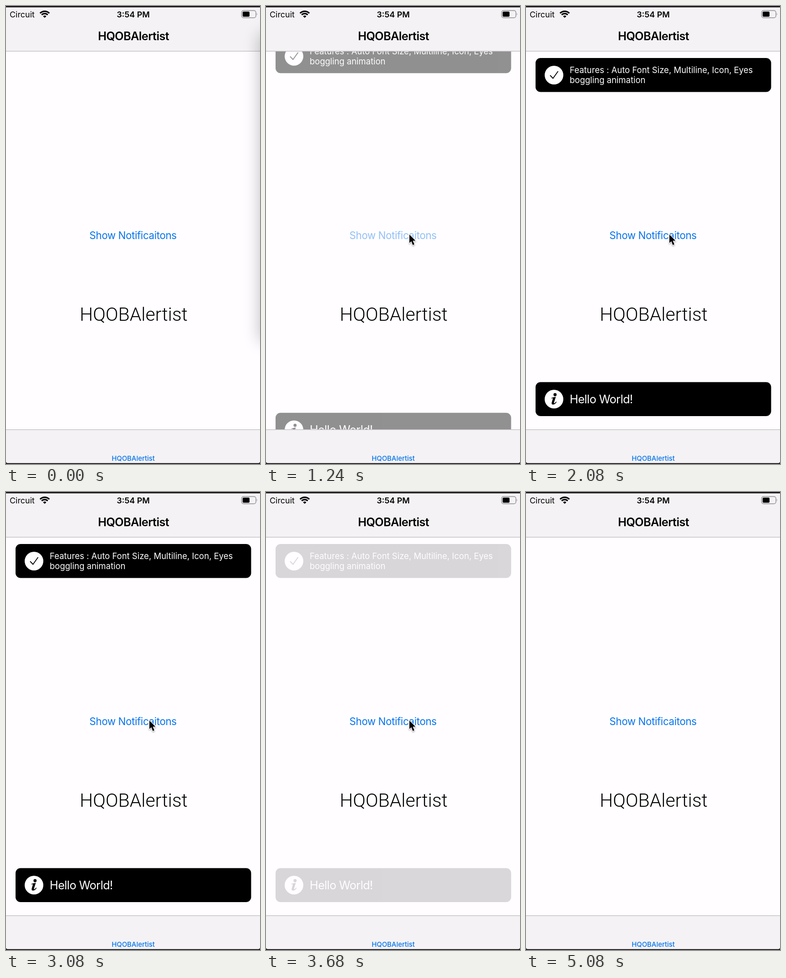
Recreate the animation shown at these times as an HTML page. Size 558 px wide and 1004 px high, loop 5.56 s.

```html
<!DOCTYPE html>
<html lang="en">
<head>
<meta charset="utf-8">
<title>Notification demo</title>
<style>
  html, body { margin: 0; width: 100%; height: 100%; overflow: hidden; background: #231f24; }
  svg { display: block; width: 100%; height: 100%; }
  text { font-family: Inter, Roboto, sans-serif; }
  .mid { text-anchor: middle; }
  .blue { fill: #0674ea; }
  .bar { fill: #f4f2f4; }
  .line { fill: #bdbcbe; }
  .card text { fill: #fff; }
</style>
</head>
<body>
<svg viewBox="0 0 558 1004">
  <defs>
    <filter id="soft" x="-100%" y="-20%" width="300%" height="140%"><feGaussianBlur stdDeviation="18"/></filter>
    <filter id="drop" x="-50%" y="-50%" width="200%" height="200%">
      <feDropShadow dx="0" dy="1.5" stdDeviation="1.5" flood-opacity=".4"/>
    </filter>
  </defs>

  <rect width="558" height="1004" fill="#231f24"/>
  <rect y="3" width="558" height="960" fill="#fffdff"/>

  <text id="button" class="mid blue" x="279" y="511" font-size="22.3" letter-spacing="-.36">Show Notificaitons</text>
  <text class="mid" x="280.5" y="690" font-size="41" font-weight="350" style="font-family: Roboto, sans-serif">HQOBAlertist</text>

  <g id="topCard" class="card">
    <rect x="21" y="114" width="517.5" height="74.5" rx="11"/>
    <circle cx="61.5" cy="151.5" r="20.5" fill="#fff"/>
    <path d="M53 152l6.3 6.5L70.5 143" fill="none" stroke="#000" stroke-width="1.8"/>
    <g font-size="18.5">
      <text x="96" y="147">Features : Auto Font Size, Multiline, Icon, Eyes</text>
      <text x="96" y="169">boggling animation</text>
    </g>
  </g>
  <g id="bottomCard" class="card">
    <rect x="21" y="824.5" width="517.5" height="74.5" rx="11"/>
    <g transform="translate(61.5 861.8)">
      <circle r="20.5" fill="#fff"/>
      <circle cx="2.3" cy="-9.8" r="3.4"/>
      <path d="M-6-2.6Q-2-4 4-5L0 7.5Q-.4 9.5 1 9Q3 8 4.5 5.5L5.8 6.3Q2.5 12-2 12Q-6 12-5 7.5L-2.5-1.3Q-2.5-2.5-6-1.5Z"/>
    </g>
    <text x="96" y="871" font-size="25.3" letter-spacing="-.6">Hello World!</text>
  </g>

  <!-- navigation bar with status row -->
  <rect class="bar" y="3" width="558" height="96"/>
  <rect class="line" y="98.5" width="558" height="1.3"/>
  <text x="8" y="25" font-size="17.9">Circuit</text>
  <path d="M85 26l-3.6-3.6A5 5 0 0 1 88.6 22.4Z"/>
  <path d="M74.8 15.8A14.4 14.4 0 0 1 95.2 15.8M78.4 19.4A9.4 9.4 0 0 1 91.6 19.4" fill="none" stroke="#000" stroke-width="3.2"/>
  <text class="mid" x="279.5" y="25" font-size="17.9" font-weight="600">3:54 PM</text>
  <rect x="517.5" y="10" width="31.5" height="15.8" rx="4.2" fill="none" stroke="#8d8c8e" stroke-width="1.4"/>
  <rect x="519.8" y="12.3" width="15.2" height="11.2" rx="2"/>
  <path d="M550.8 15.2q2 2.7 0 5.4z" fill="#8d8c8e"/>
  <text class="mid" x="280" y="75" font-size="25.3" font-weight="600" letter-spacing="-.6">HQOBAlertist</text>

  <!-- tab bar -->
  <path class="bar" d="M0 929H558V998q0 4-4 4H4q-4 0-4-4z"/>
  <rect class="line" y="928" width="558" height="1.3"/>
  <text class="mid blue" x="279.5" y="996.5" font-size="14.9" font-weight="500">HQOBAlertist</text>

  <rect id="shadow" x="558" y="60" width="100" height="675" filter="url(#soft)"/>
  <path id="cursor" d="M0 0V18.5L4.2 14.8 7.6 23 11 21.6 7.5 13.6H13.5Z" stroke="#fff" stroke-width="2" paint-order="stroke" filter="url(#drop)"/>
</svg>
<script>
  const LOOP = 5560, STEP = 40;
  const [button, topCard, bottomCard, shadow, cursor] =
    ["button", "topCard", "bottomCard", "shadow", "cursor"].map(id => document.getElementById(id));

  const progress = (t, from, to) => Math.min(1, Math.max(0, (t - from) / (to - from)));
  const smooth = p => p * p * (3 - 2 * p);
  const mix = (a, b, p) => a + (b - a) * p;
  const move = (el, x, y) => el.setAttribute("transform", `translate(${x} ${y})`);

  function drawCards(t) {
    const enter = progress(t, 1180, 1320);
    const leave = progress(t, 3545, 3765);
    const remaining = (1 - enter) ** 1.8;
    const opacity = enter * (1 - leave) ** 2;
    move(topCard, 0, -113 * remaining);
    move(bottomCard, 0, 184 * remaining);
    topCard.setAttribute("opacity", opacity);
    bottomCard.setAttribute("opacity", opacity);
  }

  function drawCursor(t) {
    const arrive = 1 - (1 - progress(t, 20, 580)) ** 2;
    const depart = progress(t, 4800, 5040) ** 2;
    move(cursor, mix(524, 315, arrive) + 108 * depart, mix(640, 501, arrive) - 186 * depart);
    cursor.setAttribute("opacity", t >= 40 && t < 5080 ? 1 : 0);
  }

  function draw(t) {
    drawCards(t);
    drawCursor(t);
    const pressed = t >= 1080;
    button.setAttribute("opacity", pressed ? mix(0.2, 1, smooth(progress(t, 1155, 1390))) : 1);
    shadow.setAttribute("opacity", 0.26 * (1 - progress(t, 600, 800)));
  }

  const start = performance.now();
  function tick() {
    const t = (performance.now() - start) % LOOP;
    draw(Math.floor(t / STEP) * STEP);
    requestAnimationFrame(tick);
  }
  tick();
</script>
</body>
</html>
```
